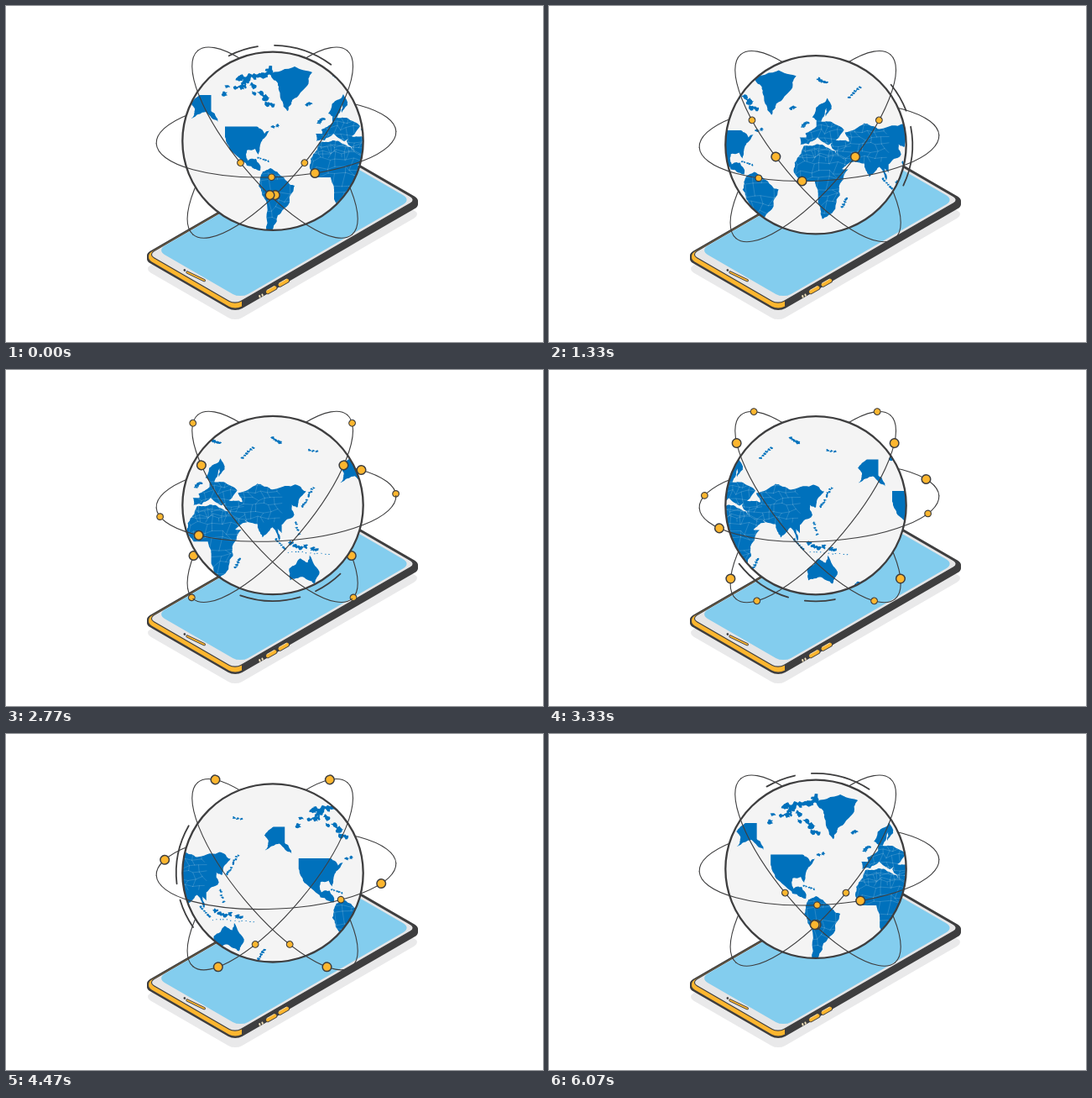
Animation, 640 px wide and 400 px high, one loop 6130 ms. Source, as an HTML page with a canvas:

```html
<!DOCTYPE html>
<html lang="en">
<head>
<meta charset="utf-8">
<title>Globe above a phone</title>
<style>
  html, body { margin: 0; width: 100%; height: 100%; overflow: hidden; background: #fff; }
  canvas { display: block; width: 640px; height: 400px; }
</style>
</head>
<body>
<canvas id="stage"></canvas>
<script>
const LOOP = 6130, TAU = Math.PI * 2;
const DARK = '#3e3e3f', BLUE = '#0071bc', AMBER = '#fdb62f', PALE = '#f4f4f4';
const canvas = document.getElementById('stage');
const ctx = canvas.getContext('2d');
const dpr = window.devicePixelRatio || 1;
canvas.width = 640 * dpr;
canvas.height = 400 * dpr;

// Repeatable noise in -0.5..0.5
const noise = (a, b) => {
  const v = Math.sin(a * 12.9898 + b * 78.233) * 43758.5453;
  return v - Math.floor(v) - 0.5;
};
const mix = (a, b, k) => a + (b - a) * k;

// ---- World map: few corner points, fractal coastlines, seeded islands ----
const MAP_WIDTH = 324;
const land = new Path2D();

// Midpoint displacement; straight borders stay straight
function coast(x1, y1, x2, y2, depth) {
  if (!depth || x1 === x2 || y1 === y2) return land.lineTo(x2, y2);
  const push = Math.min(3, Math.hypot(x2 - x1, y2 - y1) * 0.28);
  const mx = (x1 + x2) / 2 + noise(x1, y2) * push;
  const my = (y1 + y2) / 2 + noise(x2, y1) * push;
  coast(x1, y1, mx, my, depth - 1);
  coast(mx, my, x2, y2, depth - 1);
}

function continent(corners) {
  const pts = corners.split(' ').map(p => p.split(',').map(Number));
  land.moveTo(...pts[0]);
  pts.forEach((p, i) => coast(...p, ...pts[(i + 1) % pts.length], 3));
  land.closePath();
}

function islands(x1, y1, x2, y2, count, size, spread = 0) {
  for (let i = 0; i < count; i++) {
    const k = (i + 0.5) / count;
    const x = mix(x1, x2, k) + noise(i, x1) * spread;
    const y = mix(y1, y2, k) + noise(y1, i) * spread;
    for (let j = 0; j < 11; j++) {
      const r = size * (0.9 + noise(x + j, y));
      land.lineTo(x + r * Math.cos(j / 11 * TAU), y + r * 0.8 * Math.sin(j / 11 * TAU));
      if (!j) land.moveTo(x + r, y);
    }
    land.closePath();
  }
}

// Americas and Greenland
continent('244.5,106 244.5,125 253,138 238,126 221,134 225,124 220,116 231,106');
continent('261,143.5 299,143.5 308,152 314,148 304,162 301,177 297,170 287,172 288,184 298,182 303,196 287,190 270,174 261,156');
continent('306,197 315,193 331,204 344,214 338,231 324,249 314,274 308,274 310,232 301,214');
continent('312,80 344,72 365,79 358,96 341,112 336,125 328,112 324,92');
// Africa and Europe
continent('374,162 391,160 411,168 420,190 427,190 416,210 417,221 405,244 396,249 391,230 391,218 387,204 370,204 362,193 363,182');
continent('370,161 369,152 377,152 376,147 389,139 389,132 404,133 422,143 412,155 403,161 395,151 399,159 390,152 380,160');
continent('384,128 389,116 402,105 407,118 400,127 401,117 394,134 388,131');
// Asia and Australia
continent('406,161 412,155 428,157 423,146 446,135 464,142 491,136 504,144 495,156 494,163 487,160 490,172 475,184 475,194 470,189 472,203 464,187 452,199 446,183 430,178 434,181 418,191 412,168');
continent('484,236 497,224 506,229 508,220 520,240 514,254 500,246 485,250');

islands(262, 101, 296, 92, 9, 3.3, 9);
islands(276, 88, 316, 77, 9, 4.6, 5);
islands(294, 97, 318, 119, 8, 3.6, 8);
islands(299, 180, 314, 185, 5, 1.4);
islands(316, 144, 326, 142, 2, 2.4);
islands(357, 117, 364, 116, 2, 2.6);
islands(371, 140, 379, 133, 4, 2.7, 3);
islands(389, 84, 403, 85, 3, 2.6, 3);
islands(427, 105, 442, 91, 6, 1.8);
islands(463, 80, 475, 87, 4, 2.3);
islands(506, 95, 519, 97, 3, 2);
islands(419, 236, 425, 224, 4, 2.2);
islands(499, 164, 513, 138, 11, 1.5, 2);
islands(490, 178, 496, 197, 5, 1.7, 3);
islands(467, 200, 480, 214, 6, 1.7);
islands(481, 206, 520, 215, 6, 3.2, 3);
islands(480, 216, 533, 219, 12, 0.8, 2);
islands(536, 265, 545, 251, 5, 2);

// Country borders: a jittered lattice laid over some regions
const borders = new Path2D();
function addBorders(x, y, w, h, cell) {
  const node = (i, j) => [
    x + (i + noise(i + x, j) * 0.8) * cell,
    y + (j + noise(j + y, i + 9) * 0.8) * cell
  ];
  for (let j = 0; j * cell < h; j++) {
    for (let i = 0; i * cell < w; i++) {
      borders.moveTo(...node(i + 1, j));
      borders.lineTo(...node(i, j));
      if ((i + j) % 3) borders.lineTo(...node(i, j + 1));
    }
  }
}
addBorders(302, 198, 40, 72, 11);
addBorders(364, 164, 62, 82, 9.5);
addBorders(370, 130, 100, 52, 7.5);

function drawMap(t) {
  for (let k = -1; k <= 1; k++) {
    ctx.save();
    ctx.translate(MAP_WIDTH * (k - t / LOOP), 0);
    ctx.fillStyle = BLUE;
    ctx.fill(land);
    ctx.clip(land);
    ctx.strokeStyle = 'rgba(244,244,244,.5)';
    ctx.lineWidth = 0.35;
    ctx.stroke(borders);
    ctx.restore();
  }
}

// ---- Orbits: one ellipse in three positions, dots at constant speed ----
const RX = 143, RY = 47;
const ORBITS = [
  { x: 314.8, y: 162.6, turn: 50, flip: -1 },
  { x: 320.5, y: 162.6, turn: 50, flip: 1 },
  { x: 322, y: 156.5, turn: -2.9, flip: 1 }
];
const STEPS = 720;
const arc = [0];
for (let i = 1; i <= STEPS; i++) {
  const a = (i - 0.5) / STEPS * TAU;
  arc.push(arc[i - 1] + Math.hypot(RX * Math.sin(a), RY * Math.cos(a)) * TAU / STEPS);
}
const PERIMETER = arc[STEPS];

function angleAt(s) {
  s = ((s % PERIMETER) + PERIMETER) % PERIMETER;
  let i = 1;
  while (arc[i] < s) i++;
  return (i - (arc[i] - s) / (arc[i] - arc[i - 1])) / STEPS * TAU;
}

const START = 114.8, SPEED = 0.0503, LEAD = 52;

function dot(angle, r, width) {
  ctx.beginPath();
  ctx.arc(RX * Math.cos(angle), RY * Math.sin(angle), r, 0, TAU);
  ctx.fillStyle = AMBER;
  ctx.fill();
  ctx.lineWidth = width;
  ctx.stroke();
}

function withOrbit(o, draw) {
  ctx.save();
  ctx.translate(o.x, o.y);
  ctx.scale(o.flip, 1);
  ctx.rotate(o.turn * Math.PI / 180);
  ctx.strokeStyle = DARK;
  draw();
  ctx.restore();
}

function drawOrbits(t, front) {
  for (const o of ORBITS) withOrbit(o, () => {
    ctx.beginPath();
    ctx.ellipse(0, 0, RX, RY, 0, front ? 0 : Math.PI, front ? Math.PI : TAU);
    ctx.lineWidth = 1.1;
    ctx.stroke();
  });
  for (const o of ORBITS) withOrbit(o, () => {
    for (const time of [t, t - LOOP]) {
      const s = START + SPEED * time;
      const large = angleAt(s), small = angleAt(s + LEAD);
      if ((small < Math.PI) === front) dot(small, 3.8, 1.2);
      if ((large < Math.PI) === front) dot(large, 5.3, 1.5);
    }
  });
}

// ---- Globe ----
const GX = 318, GY = 160.8;

function globePath() {
  ctx.beginPath();
  ctx.ellipse(GX, GY, 107.7, 106.1, 0, 0, TAU);
}

function drawSweeps(t) {
  const turn = t / LOOP * 360;
  ctx.strokeStyle = DARK;
  ctx.lineWidth = 1.8;
  ctx.lineCap = 'round';
  for (const [from, to] of [[-117, -99], [-89, -53]]) {
    ctx.beginPath();
    ctx.ellipse(GX, GY, 115.2, 114, 0, (from + turn) * Math.PI / 180, (to + turn) * Math.PI / 180);
    ctx.stroke();
  }
}

function drawGlobe(t) {
  const bob = 2.3 * (1 + Math.cos(TAU * (2 * t / LOOP - 0.48)));
  ctx.save();
  ctx.translate(0, bob);
  drawOrbits(t, false);
  ctx.save();
  globePath();
  ctx.fillStyle = PALE;
  ctx.fill();
  ctx.clip();
  drawMap(t);
  ctx.restore();
  globePath();
  ctx.strokeStyle = DARK;
  ctx.lineWidth = 2.3;
  ctx.stroke();
  drawSweeps(t);
  drawOrbits(t, true);
  ctx.restore();
}

// ---- Phone, in an isometric frame ----
function isoRect(x, y, w, h, r) {
  const flat = new Path2D(), out = new Path2D();
  flat.roundRect(0, 0, w, h, r);
  out.addPath(flat, new DOMMatrix([0.866, -0.5, 0.866, 0.5, x, y]));
  return out;
}
const body = isoRect(164.5, 297, 255.5, 125.5, 9);
const rim = isoRect(165.9, 297, 253.9, 123.9, 8.5);
const face = isoRect(169.4, 295.7, 249.7, 119.6, 8);
const screen = isoRect(179.8, 290.7, 235, 115, 10.5);

function slab(shape, dy, color, outline) {
  ctx.save();
  ctx.translate(0, dy);
  ctx.fillStyle = color;
  ctx.fill(shape);
  if (outline) {
    ctx.strokeStyle = DARK;
    ctx.lineWidth = outline;
    ctx.stroke(shape);
  }
  ctx.restore();
}

function line(x, y, dx, dy, width, color) {
  ctx.beginPath();
  ctx.moveTo(x, y);
  ctx.lineTo(x + dx, y + dy);
  ctx.lineWidth = width;
  ctx.strokeStyle = color;
  ctx.stroke();
}

function drawPhone() {
  ctx.lineCap = 'round';
  slab(body, 16, '#e9e9ea');
  for (let d = 0; d <= 4; d++) slab(body, d, DARK, 2);
  ctx.save();
  ctx.beginPath();
  ctx.rect(160, 230, 121, 150);
  ctx.clip();
  for (let d = 0; d <= 3; d++) slab(rim, d, AMBER);
  ctx.restore();
  slab(face, 0, '#e6e6e7', 1.1);
  slab(screen, 0, '#83cdee');

  // Speaker
  line(216, 317, 20.3, 9.7, 3.2, DARK);
  line(216, 317, 20.3, 9.7, 1.6, AMBER);
  line(212.8, 314.4, 0.1, 0.1, 2.6, DARK);

  // Side buttons and socket
  for (let i = 0; i < 2; i++) {
    const x = 312 + i * 14.6, y = 340.2 - i * 8.5;
    line(x, y, 8.4, -4.8, 6, DARK);
    line(x, y, 8.4, -4.8, 4.2, AMBER);
    line(x - 1, y - 1.8, 8.6, -4.8, 0.8, '#fff0cf');
    line(302.2 + i * 3.2, 345 - i * 1.6, 0.4, 1.4, 2, '#f2e3bd');
  }
}

function frame(now) {
  const t = now % LOOP;
  ctx.setTransform(dpr, 0, 0, dpr, 0, 0);
  ctx.fillStyle = '#fff';
  ctx.fillRect(0, 0, 640, 400);
  drawPhone();
  drawGlobe(t);
}

let start = null;
function tick(now) {
  if (start === null) start = now;
  frame(Math.max(0, now - start));
  requestAnimationFrame(tick);
}
frame(0);
requestAnimationFrame(tick);
</script>
</body>
</html>
```
